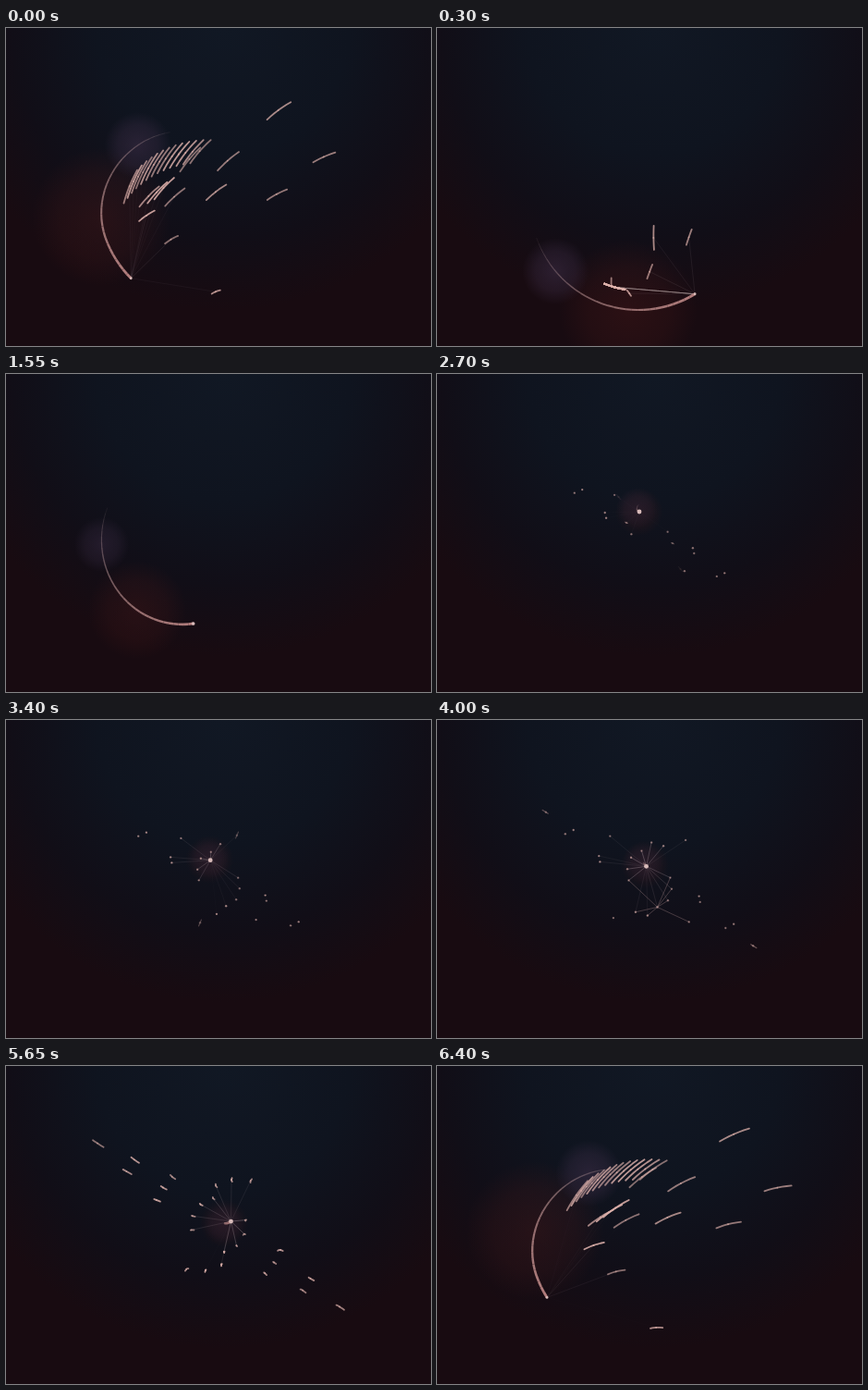
These frames come from a looping animation (460 px wide and 344 px high, 6.45 s). An HTML page with a canvas:

```html
<!DOCTYPE html>
<html lang="en">
<head>
<meta charset="utf-8">
<title>Comet and sparks</title>
<style>
html, body { margin: 0; width: 100%; height: 100%; overflow: hidden; background: #180b11; }
canvas { display: block; }
</style>
</head>
<body>
<canvas id="stage" width="460" height="344"></canvas>
<script>
const LOOP = 6450, STEP = 50, TAU = Math.PI * 2, DEG = Math.PI / 180;
const ctx = document.getElementById('stage').getContext('2d');

const mix = (a, b, s) => a + (b - a) * s;
const clamp = s => Math.min(1, Math.max(0, s));
const smooth = (a, b, t) => {
  const s = clamp((t - a) / (b - a));
  return s * s * (3 - 2 * s);
};
const wrap = t => (t % LOOP + LOOP) % LOOP;
const at = ([x, y], r, a) => [x + r * Math.cos(a), y + r * Math.sin(a)];
const blend = (p, q, s) => [mix(p[0], q[0], s), mix(p[1], q[1], s)];
const distance = (p, q) => Math.hypot(p[0] - q[0], p[1] - q[1]);

let seed = 11;
function random() {
  seed = (seed * 16807) % 2147483647;
  return seed / 2147483647;
}

// The comet rests near the middle, then swings out onto a wide orbit
const ORBIT = [218, 188], HUB = [230, 172];

function comet(t) {
  t = wrap(t);
  const s = t > 3050 ? t - LOOP : t;
  const swing = smooth(-950, -100, s) * (1 - smooth(1100, 2600, s));
  const rest = blend([219, 149], [236, 170], clamp((t - 2700) / 1950) ** 2);
  return at(blend(rest, ORBIT, swing), 117 * swing, (135 - .255 * s) * DEG);
}

// Rows of 1, 2, 3 and 4 form an arm, a short tail follows; each has a mirror twin
const particles = [];
function addPair(radius, angle) {
  const order = (particles.length / 2 + 12) % 13;
  const wobble = (random() - .5) * 14, twist = (random() - .5) * .2;
  for (const turn of [0, Math.PI]) {
    particles.push({
      radius, wobble, twist,
      angle: angle + turn,
      arrival: 2150 + 1900 * (order / 12) ** 1.5,
      light: mix(.65, 1, random())
    });
  }
}
for (let row = 0; row < 4; row++) {
  const radius = 155 - 42 * row;
  for (let j = 0; j <= row; j++) addPair(radius, 34 * DEG + (j - row / 2) * 15 / radius);
}
for (let j = 0; j < 3; j++) addPair(42 + 8 * j, (86 + 20 * j) * DEG);

// Spark fan: half of the sparks pile up along one streak, the rest scatter
particles.forEach((p, i) => {
  const u = 1 - i / particles.length;
  p.reach = i % 2 ? 12 + 90 * u : 28 + 195 * u ** 2;
  p.fan = i % 2 ? mix(-58, -30, u) * DEG : mix(-30, 0, random()) * DEG;
  if (i % 8 === 6) p.fan += 50 * DEG;
});

function galaxy(p, t) {
  const pulse = Math.sin(Math.PI * clamp((t - 4650) / 1200)) ** 2;
  const away = 1 - smooth(p.arrival - 450, p.arrival + 100, t);
  const scale = .77 + .1 * smooth(2700, 4000, t) + .6 * pulse;
  const loose = 1 - smooth(4000, 4700, t);
  const r = (p.radius * scale + p.wobble * loose) * (1 + 1.3 * away ** 2);
  return at(HUB, r, p.angle + p.twist * loose * 2 + TAU * smooth(4150, 5480, t));
}

function spark(p, t) {
  const dt = t - LOOP, fall = .3 * dt + .0004 * Math.max(0, dt) ** 2;
  const target = blend(ORBIT, comet(t - 185), .82);
  return at(target, Math.max(0, p.reach - fall), p.fan - .0013 * dt);
}

function place(p, t) {
  const s = smooth(5650, 6300, t);
  if (s === 0) return galaxy(p, t);
  return s === 1 ? spark(p, t) : blend(galaxy(p, t), spark(p, t), s);
}

function line(points, color, width) {
  ctx.beginPath();
  points.forEach(p => ctx.lineTo(p[0], p[1]));
  ctx.strokeStyle = color;
  ctx.lineWidth = width;
  ctx.stroke();
}

function dot([x, y], r, color) {
  ctx.beginPath();
  ctx.arc(x, y, r, 0, TAU);
  ctx.fillStyle = color;
  ctx.fill();
}

function glow([x, y], r, rgb, alpha) {
  const g = ctx.createRadialGradient(x, y, 0, x, y, r);
  g.addColorStop(0, `rgba(${rgb},${alpha})`);
  g.addColorStop(.6, `rgba(${rgb},${alpha * .6})`);
  g.addColorStop(1, `rgba(${rgb},0)`);
  ctx.fillStyle = g;
  ctx.fillRect(x - r, y - r, 2 * r, 2 * r);
}

function background() {
  const g = ctx.createRadialGradient(235, 0, 0, 235, 0, 305);
  g.addColorStop(0, '#111824');
  g.addColorStop(.45, '#0f141f');
  g.addColorStop(.75, '#110e17');
  g.addColorStop(1, '#180b11');
  ctx.fillStyle = g;
  ctx.fillRect(0, 0, 460, 344);
}

function drawParticles(t, head, power) {
  const u = t < 1500 ? t + LOOP : t;
  const fade = 1 - smooth(LOOP + 350, LOOP + 590, u);
  if (fade === 0) return;
  const active = smooth(4100, 4600, u);
  const links = .1 + .9 * smooth(2700, 3900, u) - .6 * power;
  const range = mix(62, 130, power);

  for (const p of particles) {
    const alpha = fade * smooth(p.arrival - 400, p.arrival, u);
    if (!alpha) continue;
    const trail = Array.from({ length: 7 }, (_, k) => place(p, u + (k - 3) * 9));
    const here = trail[3];
    const near = clamp(1 - distance(here, head) / range);
    line([head, here], `rgba(185,165,172,${alpha * Math.max(0, links) * near * .6})`, .8);

    const spread = clamp(1.05 - distance(here, HUB) / 230);
    const level = alpha * p.light * mix(.6, mix(spread, .9, smooth(5300, 5650, u)), active);
    const color = `rgba(220,176,170,${level})`;
    line(trail, color, mix(1.2, 1.8, active));
    dot(here, mix(1.2, .9, active), color);
  }

  // A second hub, linked to its neighbours
  const web = smooth(3500, 3900, u) * (1 - smooth(4200, 4500, u));
  if (web) {
    const hub = place(particles[18], u);
    for (const p of particles) {
      const end = place(p, u);
      if (distance(end, hub) < 45) line([hub, end], `rgba(190,150,150,${web * .4})`, .8);
    }
  }
}

function drawComet(t, head, power) {
  const n = 32, lag = 400 / n;
  ctx.lineCap = 'butt';
  for (let k = n; k > 0; k--) {
    const s = 1 - (k - 1) / n;
    line([comet(t - k * lag), comet(t - (k - 1) * lag)],
      `rgba(${mix(215, 195, s)},${mix(185, 138, s)},${mix(185, 136, s)},${.9 * s ** .7})`,
      mix(.8, 2.8, s));
  }
  ctx.lineCap = 'round';
  dot(head, mix(2.4, 1.4, power), '#d9bcba');
}

// Shock ring where the last sparks are swallowed
function drawRing(t, head) {
  const age = t - 560;
  if (age <= 0 || age > 700) return;
  ctx.beginPath();
  ctx.ellipse(326.5, 154.5, age * .25, age * .31, -.3, 0, TAU);
  ctx.strokeStyle = `rgba(216,190,194,${.95 * (1 - smooth(60, 700, age))})`;
  ctx.lineWidth = 2.5;
  ctx.stroke();
  dot(head, 3, '#d9bcba');
}

function draw(now) {
  const t = Math.floor(now % LOOP / STEP) * STEP;
  const head = comet(t);
  const power = Math.max(smooth(5700, 6300, t), 1 - smooth(900, 2300, t));
  ctx.lineCap = ctx.lineJoin = 'round';
  background();
  glow(comet(t - 145), mix(26, 75, power), '78,26,25', mix(.28, .36, power));
  glow(comet(t - 320), mix(22, 36, power), '62,46,72', mix(.25, .55, power));
  drawParticles(t, head, power);
  drawComet(t, head, power);
  drawRing(t, head);
  requestAnimationFrame(draw);
}
requestAnimationFrame(draw);
</script>
</body>
</html>
```
